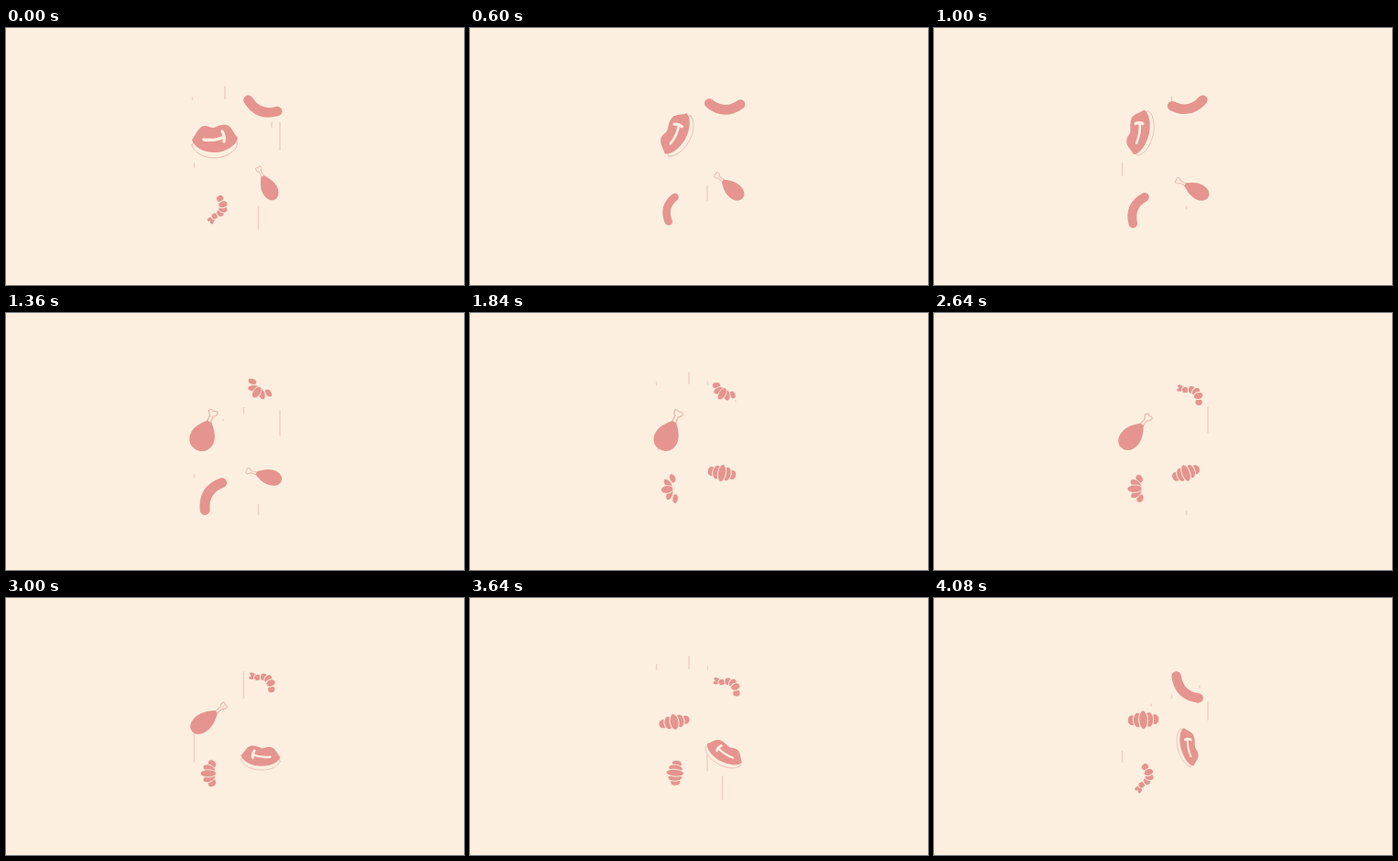
Write an HTML page with a canvas that moves like this. It is 500 by 281 pixels and loops after 4.12 s.

```html
<!DOCTYPE html>
<html lang="en">
<head>
<meta charset="utf-8">
<title>Tumbling food</title>
<style>
html, body { margin: 0; width: 100%; height: 100%; overflow: hidden; background: #fcefdf; }
canvas { display: block; width: 500px; height: 281px; }
</style>
</head>
<body>
<canvas id="stage" width="500" height="281"></canvas>
<script>
const ctx = document.getElementById('stage').getContext('2d');
const LOOP = 4120, STEP = 40, FALL = 480;
const PAPER = '#fcefdf', MEAT = '#e5948f', LINE = '#ecbaad', RAIN = '#f3cec2';

const lerp = (a, b, k) => a + (b - a) * k;

function fill(path, color) { ctx.fillStyle = color; ctx.fill(path); }

function stroke(path, color, width) {
  ctx.strokeStyle = color;
  ctx.lineWidth = width;
  ctx.stroke(path);
}

function oval(x, y, rx, ry, angle) {
  const p = new Path2D();
  p.ellipse(x, y, rx, ry, angle, 0, 7);
  return p;
}

// Foods are drawn around their own pivot, lying along the x axis.

const SAUSAGE = new Path2D('M-17 -6.5Q0 6.5 17 -6.5');
const sausage = () => stroke(SAUSAGE, MEAT, 10.5);

const SLAB = new Path2D(`M-25 1C-21 -3 -18 -14 -11 -14C-6 -14 -5 -11 -1 -12C4 -14 8 -16 13 -15
  C19 -13 21 -4 25 -1C24 7 12 15 0 15C-13 15 -23 9 -25 1Z`);
const T_BONE = new Path2D('M-12 1Q0 3 10 -2M8 -8Q11 -3 10 3');

function steak() {
  ctx.translate(0, 6);
  fill(SLAB, PAPER);
  stroke(SLAB, LINE, 1);
  ctx.translate(0, -6);
  fill(SLAB, MEAT);
  stroke(T_BONE, PAPER, 3.4);
}

const SHANK = new Path2D('M-17 -1.6L-27 -1.4C-29 -5 -36 -4 -32 0C-36 4 -29 5 -27 1.4L-17 1.6');
const LEG = new Path2D('M-20 -2C-13 -7 -7 -10 0 -10C8 -10 14 -6 14 0C14 6 8 10 0 10C-7 10 -13 7 -20 2Z');

function drumstick() {
  stroke(SHANK, LINE, 1.1);
  fill(LEG, MEAT);
}

// Overlapping lobes along an arch of half length `reach`, small ones at the back.
function lobes(reach, bend, sizes) {
  const mid = (sizes.length - 1) / 2;
  const order = [...sizes.keys()].sort((a, b) => sizes[a] - sizes[b]);
  for (const i of order) {
    const u = i / mid - 1;
    const p = oval(u * reach, bend * -u * u / 2, reach / mid * .78, sizes[i], Math.atan2(-bend * u, reach));
    fill(p, MEAT);
    stroke(p, PAPER, 1);
  }
}

const roll = ({ bend }) => lobes(12.5, bend, [6, 8.5, 10.5, 8.5, 6]);

function shrimp() {
  for (const turn of [-.1, -.9]) {
    fill(oval(-12 - 3 * Math.cos(turn), 7 - 3 * Math.sin(turn), 4.5, 2, turn), MEAT);
  }
  lobes(10, -13, [3.6, 4.4, 5.1, 5.3, 4.2]);
}

// One act: a food moves from a pose by `change` until the slot's next act.
// `depth` flattens it, a negative one mirrors it, `ease` is a power of time.
function act(food, from, pose, change, ease = 1) {
  return { food, from, ease, change, pose: { turn: 0, size: 1, depth: 1, bend: 0, ...pose } };
}

const slots = [
  [
    act(steak, 0, { x: 228, y: 121 }, { x: -5, y: -8, turn: -84, depth: -.27 }, .45),
    act(drumstick, 1280, { x: 214, y: 137, turn: 113, depth: 1.35 }, { turn: 40, depth: -.5 }, 2),
    act(roll, 3320, { x: 219, y: 137, turn: -16, depth: .75 }, { x: 10, y: -4, turn: 14, depth: .25 })
  ],
  [
    act(sausage, 0, { x: 278, y: 91, turn: 21 }, { y: -3, turn: -36 }),
    act(roll, 1120, { x: 273, y: 86, turn: 38, size: .9, depth: .72, bend: 24 },
      { x: 5, y: 5, turn: -16, size: -.2, depth: .3, bend: -22 }),
    act(shrimp, 2640, { x: 286, y: 86, turn: 42 }, { x: 1, y: 9, turn: -7 }),
    act(sausage, 3960, { x: 272, y: 102, turn: 48 }, { turn: -4 })
  ],
  [
    act(shrimp, 0, { x: 237, y: 198, turn: -73, depth: -1 }, { y: 2, turn: 8 }),
    act(sausage, 320, { x: 213, y: 197, turn: 98, size: .72 }, { x: 11, turn: 34, size: .45 }),
    act(roll, 1800, { x: 215, y: 193, turn: 82, size: .9, depth: .7, bend: 24 },
      { x: 10, y: -2, turn: 14, size: -.1, depth: .5, bend: -24 }),
    act(shrimp, 3880, { x: 235, y: 194, turn: -83, depth: -1 }, { y: 2, turn: 4 })
  ],
  [
    act(drumstick, 0, { x: 288, y: 177, turn: 62, size: .85 }, { x: 2, y: 4, turn: -62 }),
    act(roll, 1840, { x: 275, y: 175, turn: 10, size: .92 }, { turn: -34 }),
    act(steak, 2760, { x: 278, y: 173, turn: 180, size: .86, depth: -.85 }, { y: -11, turn: 80, depth: .2 }, 2.5)
  ]
];

function perform(acts, t) {
  const i = acts.findLastIndex(a => a.from <= t);
  const { food, from, ease, change, pose } = acts[i];
  const end = acts[i + 1]?.from ?? LOOP;
  const k = ((t - from) / (end - from)) ** ease;
  const now = { ...pose };
  for (const key in change) now[key] += change[key] * k;
  ctx.save();
  ctx.translate(now.x, now.y);
  ctx.rotate(now.turn * Math.PI / 180);
  ctx.scale(now.size, now.size * now.depth);
  food(now);
  ctx.restore();
}

// A streak grows downward, then its tail catches up; it repeats every `period`.
function streak(x, top, length, start, period, t) {
  const p = ((t - start) % period + period) % period / FALL;
  if (p >= 1) return;
  const head = top + length * Math.min(1, p * 2);
  const tail = top + length * Math.max(0, p * 2 - 1);
  stroke(new Path2D(`M${x} ${tail}V${head + .5}`), RAIN, 1.4);
}

const streaks = [
  [203.5, 63, 15, -450, 1845],
  [239, 64, 13, -240, 1820],
  [259.5, 75, 34, 20, 900],
  [290, 96, 12, -385, 2220],
  [299, 103, 30, -240, 1330],
  [205.5, 148, 31, -30, 930],
  [237, 116, 7, -48, 1360],
  [259, 172, 18, 384, 1517],
  [275.5, 195, 25, -230, 1210],
  [271, 72, 6, 2080, LOOP]
];

function draw(now) {
  const t = Math.floor(now % LOOP / STEP) * STEP;
  ctx.fillStyle = PAPER;
  ctx.fillRect(0, 0, 500, 281);
  ctx.lineCap = 'round';
  ctx.lineJoin = 'round';
  for (const s of streaks) streak(...s, t);
  for (const acts of slots) perform(acts, t);
}

const begin = performance.now();
function tick() {
  draw(performance.now() - begin);
  requestAnimationFrame(tick);
}
tick();
</script>
</body>
</html>
```
